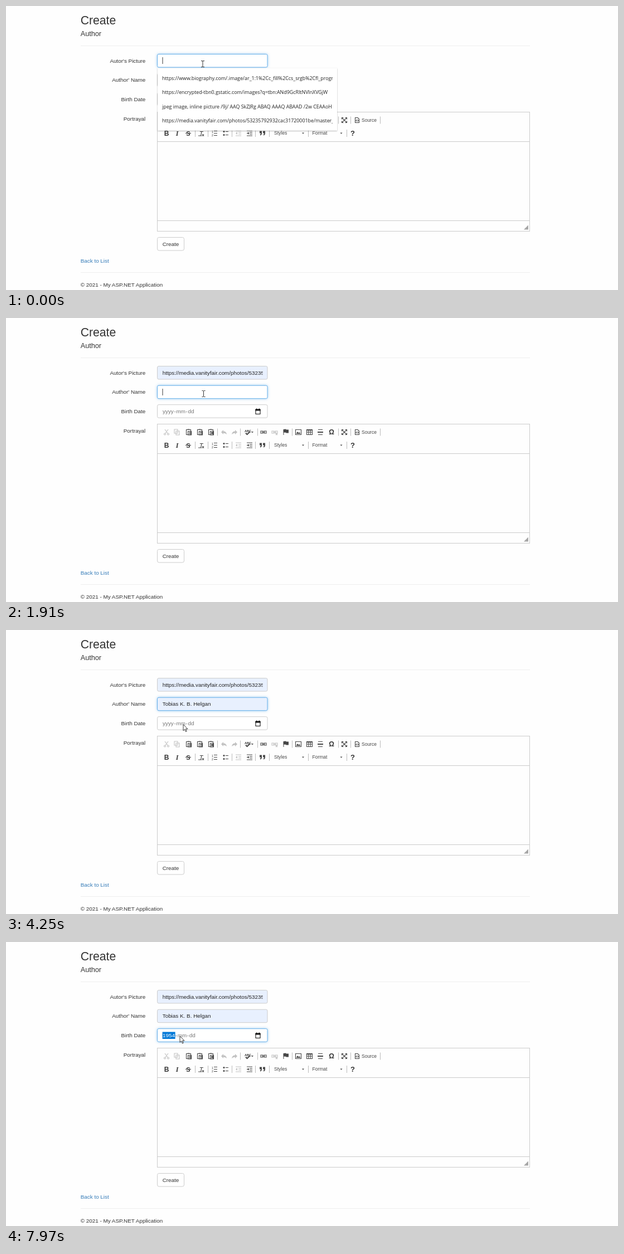
These frames come from a looping animation (1098x510 px, 8000 ms). An HTML page:

```html
<!DOCTYPE html>
<html lang="en">
<head>
<meta charset="utf-8">
<title>Create author form</title>
<style>
  html, body { margin: 0; width: 100%; height: 100%; overflow: hidden; background: #fefefe; }
  svg { display: block; }
  text { font: 9.9px "Liberation Sans", Arial, sans-serif; fill: #333; white-space: pre; }
  .bold { font-weight: bold; }
  .small { font-size: 8.5px; fill: #474747; }
  .field { fill: #fff; stroke: #ccc; }
  .filled { fill: #e8f0fe; }
  .focus { stroke: #66afe9; filter: drop-shadow(0 0 2.5px rgba(102, 175, 233, .6)); }
  .value { fill: #222; }
  .hint { fill: #757575; }
  .selected { fill: #fff; }
  .frame { fill: none; stroke: #cbcbcb; }
  .rule { stroke: #eee; }
  .sep { stroke: #bcbcbc; }
  .line { fill: none; stroke: #474747; stroke-width: 1.1; }
  .solid { fill: #474747; stroke: none; }
  .glyph { font-size: 12px; font-weight: bold; text-anchor: middle; }
  .off { opacity: .33; }
  .panel { fill: #fff; filter: drop-shadow(0 1px 1px rgba(0, 0, 0, .28)); }
  .option { font: 500 9.1px "Open Sans", "Noto Sans", sans-serif; fill: #222; }
  .address { font-size: 8.85px; }
  .caret { stroke: #222; stroke-width: .9; }
</style>
</head>
<body>
<svg width="1098" height="510" viewBox="0 0 1098 510">
  <text x="133.7" y="32.5" style="font-size:21.2px">Create</text>
  <text x="133.7" y="54" style="font-size:12.7px">Author</text>
  <path class="rule" d="M134 71.5H940M134 478.5H940"/>
  <g class="bold" text-anchor="end">
    <text x="250.3" y="101.7">Autor's Picture</text>
    <text x="250.3" y="136.3">Author' Name</text>
    <text x="250.3" y="171">Birth Date</text>
    <text x="250.3" y="205.6">Portrayal</text>
  </g>
  <rect class="frame" x="271.5" y="190.5" width="668" height="214"/>
  <path class="frame" d="M272 243.5H939M272 385.5H939"/>
  <path d="M937 393.5V401.5H929Z" fill="#a6a6a6"/>
  <g id="toolbar"></g>
  <rect class="field" x="271.5" y="415.5" width="48" height="23.5" rx="3"/>
  <text x="295.5" y="431" text-anchor="middle">Create</text>
  <text x="133.7" y="460.5" style="fill:#337ab7">Back to List</text>
  <text x="133.7" y="503.6">© 2021 - My ASP.NET Application</text>
  <g id="live"></g>
</svg>
<script>
const LOOP = 8000;
const byId = id => document.getElementById(id);

// Toolbar
const box = (x, y, w, h) => `M${x} ${y}h${w}v${h}h${-w}z`;
const ring = (x, y, r) => `M${x - r} ${y}a${r} ${r} 0 1 0 ${2 * r} 0a${r} ${r} 0 1 0 ${-2 * r} 0`;
const line = d => `<path class="line" d="${d}"/>`;
const solid = d => `<path class="solid" d="${d}"/>`;
const glyph = (s, style = '') => `<text class="glyph" y="4" style="${style}">${s}</text>`;
const at = (x, y, art, cls = '') => `<g class="${cls}" transform="translate(${x} ${y})">${art}</g>`;

const clipboard = line(box(-4.5, -4.5, 8, 9) + 'M-2.5-5h4' + box(-1.5, -1.5, 6, 6.5));
const backArrow = solid('M-5 0L-1-4V-1.5Q4-2 5 4Q3 1.5-1 1.5V4z');
const chain = line(box(-5, -2, 4, 4) + box(1, -2, 4, 4) + 'M-3 0H3');
const textLines = line('M-1-4H5M-1 0H5M-1 4H5');
const triangle = solid('M-2-1H2L0 1.3z');
const indentLines = line('M-5-4.5H5M0-1.5H5M0 1.5H5M-5 4.5H5');
const comma = 'h4v4q0 3-3 4v-2q1.2-.5 1.2-2h-2.2z';

const topRow = [
  [288, line('M-3-5L2 2M3-5L-2 2' + ring(-3, 3.5, 1.5) + ring(3, 3.5, 1.5)), 'off'],
  [307, line(box(-5, -5, 6, 7) + box(-2, -2, 6, 7)), 'off'],
  [328, clipboard + line('M0 .5H3M0 2.5H3')],
  [348, clipboard + line('M0 .5H3M1.5 .5V4')],
  [368, clipboard + solid(box(0, 0, 3, 3))],
  [391, backArrow, 'off'],
  [410, `<g transform="scale(-1 1)">${backArrow}</g>`, 'off'],
  [434, '<text x="-6" y="-.5" class="bold" style="font-size:5.5px">ABC</text>' +
        '<path class="line" style="stroke-width:2" d="M-4 1.5l2.5 2.5L4-1"/>'],
  [442, triangle],
  [462, chain],
  [482, chain + line('M2 2l3 3M5 2l-3 3'), 'off'],
  [502, solid('M-4.5-5h1v10h-1zM-3.5-5Q0-6 1-4.5H5V1.5H1Q-1-.2-3.5 .7z')],
  [524.5, line(box(-5, -4.5, 10, 9)) + solid('M-4 3L-1.5-1L.5 1.5L2 0L4 3z')],
  [544.5, line(box(-5, -4.5, 10, 9) + 'M-5-3.5H5M-5 0H5M-1.7-4V4M1.7-4V4')],
  [564, line('M-4-4.5H4M-5-.5H5M-5 .5H5M-4 4.5H4')],
  [584, glyph('Ω')],
  [607, line('M-4.5-1.5V-4.5H-1.5M1.5-4.5H4.5V-1.5M4.5 1.5V4.5H1.5M-1.5 4.5H-4.5V1.5') +
        line('M-4.5-4.5L4.5 4.5M4.5-4.5L-4.5 4.5')],
  [630, line('M-3.5-4.5H1L3.5-2V4.5H-3.5zM-.5-1L-2 .8L-.5 2.5M.7-1L2.2 .8L.7 2.5')],
];
const bottomRow = [
  [288, glyph('B')],
  [307, glyph('I', "font-style:italic;font-family:'Liberation Serif',serif")],
  [327, glyph('S', 'font-size:11px') + line('M-5 0H5')],
  [350, glyph('T', 'font-style:italic;font-size:11px;font-weight:normal') + line('M-5 4.5H1M2 2l3 3M5 2l-3 3')],
  [374, textLines + '<text x="-5" y="-1" style="font-size:5px">1</text><text x="-5" y="5.5" style="font-size:5px">2</text>'],
  [394, line('M0-3H5M0 3H5') + solid(ring(-3, -3, 1.6) + ring(-3, 3, 1.6))],
  [417, indentLines + solid('M-2-2.5V2.5L-5 0z'), 'off'],
  [437, indentLines + line('M-5 0H-2') + solid('M-3-2.5V2.5L-.5 0z')],
  [460, solid('M-5-4' + comma + 'M1-4' + comma)],
  [533, triangle],
  [601.5, triangle],
  [622, glyph('?', 'font-size:13px')],
];
const seps = (y, xs) => `<path class="sep" d="${xs.map(x => `M${x} ${y - 6.5}v13`).join('')}"/>`;
const small = (x, y, s) => `<text class="small" x="${x}" y="${y}">${s}</text>`;

byId('toolbar').innerHTML =
  topRow.map(([x, art, cls]) => at(x, 205, art, cls)).join('') +
  bottomRow.map(([x, art, cls]) => at(x, 228.5, art, cls)).join('') +
  seps(205, [379.5, 420.5, 451.5, 513.5, 596.5, 618.5, 671.5]) +
  seps(228.5, [339.5, 362.5, 405.5, 447.5, 472.5, 542.5, 611.5]) +
  small(638, 208, 'Source') + small(481, 231.2, 'Styles') + small(549.5, 231.2, 'Format');

// Timeline: each track holds its value until the next entry
const addresses = [
  'https://www.biography.com/.image/ar_1:1%2Cc_fill%2Ccs_srgb%2Cfl_progressive',
  'https://encrypted-tbn0.gstatic.com/images?q=tbn:ANd9GcRItNVlnXVGjW',
  'jpeg image, inline picture /9j/ AAQ SkZJRg ABAQ AAAQ ABAAD /2w CEAAoH',
  'https://media.vanityfair.com/photos/53235792932cac31720001be/master_',
];
const author = 'Tobias K. B. Helgan';
const names = ['VARDEN PIKE AND THE LORDS OF ELMOTH', "Brann's Grill", 'Corby Denner',
  'L.B. Tarvick', 'Quilla', 'Melon Hollow 2'];

const lists = {
  addresses: { top: 111.5, width: 322, items: addresses, cls: 'address' },
  names: { top: 146, width: 220, items: names },
  match: { top: 146, width: 197, items: [author] },
};
const tracks = {
  focus: [[0, 'picture'], [1910, 'name'], [4900, 'date']],
  list: [[0, 'addresses'], [1080, ''], [2040, 'names'], [2610, 'match'], [3690, '']],
  hover: [[0, -1], [160, 1], [280, 2], [570, 3], [1080, -1], [3300, 0]],
  picture: [[0, ''], [160, addresses[1]], [280, addresses[2]], [570, addresses[3]]],
  name: [[0, ''], [2610, author[0]], [3300, author]],
  year: [[0, 'yyyy'], [5790, '0001'], [6190, '0019'], [6470, '0195'], [6740, '1954']],
  caret: [[0, [281, 98]], [160, null], [1910, [281, 133]], [2470, null], [2610, [287.5, 133]],
    [3180, null], [3690, [369.5, 133]], [4250, null], [4640, [369.5, 133]], [4900, null]],
  pointer: [
    [0, ['beam', 353, 104]], [160, ['arrow', 354, 148]], [280, ['arrow', 356, 184]],
    [430, ['arrow', 361, 195]], [570, ['arrow', 362, 202]], [690, ['arrow', 362, 204]],
    [1080, ['arrow', 358, 150]], [1230, ['beam', 358, 136]], [1350, ['beam', 356, 131]],
    [1490, ['beam', 354.5, 136]], [2320, ['beam', 357.5, 90]], [2470, ['arrow', 364.5, 69.5]],
    [2610, ['arrow', 366, 67]], [2900, ['beam', 359, 92]], [3020, ['beam', 354.5, 105]],
    [3180, ['beam', 354, 130]], [3300, ['arrow', 352, 155]], [3420, ['arrow', 351, 161]],
    [3820, ['arrow', 351, 165]], [3950, ['arrow', 351, 167.5]], [4100, ['arrow', 341, 169]],
    [4250, ['arrow', 318, 169.5]], [4370, ['arrow', 312, 171]], [4520, ['arrow', 302, 173]],
    [4640, ['arrow', 296, 175]], [4900, ['arrow', 294, 172]], [7420, ['arrow', 301, 170]],
    [7540, ['arrow', 309, 167]], [7830, ['arrow', 310, 167.5]], [7970, ['arrow', 312, 169]],
  ],
};
const valueAt = (track, t) => track.findLast(([start]) => start <= t)[1];

// Live parts
const field = (y, focused, filled) =>
  `<rect class="field ${filled ? 'filled' : ''} ${focused ? 'focus' : ''}" x="271.5" y="${y}" width="197.5" height="23.5" rx="2.5"/>`;

const clipped = (x, y, width, cls, s) =>
  `<svg x="${x}" y="${y - 12}" width="${width}" height="24"><text class="${cls}" y="15.6">${s}</text></svg>`;

function dateText(year, selected) {
  const width = year === 'yyyy' ? 21 : 23;
  return (selected ? `<rect x="280.6" y="161.5" width="${width}" height="12.5" fill="#0078d7"/>` : '') +
    `<text class="hint" x="281" y="171"><tspan class="${selected ? 'selected' : ''}">${year}</tspan>` +
    ['-', 'mm', '-', 'dd'].map(s => `<tspan dx=".7">${s}</tspan>`).join('') + '</text>' +
    '<path d="M448 164.5h8v8h-8z" fill="none" stroke="#111" stroke-width="1.1"/>' +
    '<path d="M447.5 163.5h9v3h-9zM449 162.5h1.2v2h-1.2zM453.8 162.5h1.2v2h-1.2z" fill="#111"/>';
}

function dropdown({ top, width, items, cls = '' }, hover) {
  const pitch = 25.4, first = top + 5.3;
  return `<rect class="panel" x="272" y="${top}" width="${width}" height="${items.length * pitch + 10.6}"/>` +
    (hover < 0 ? '' : `<rect x="272" y="${first + hover * pitch}" width="${width}" height="${pitch}" fill="#e6e6e6"/>`) +
    items.map((s, i) => clipped(280, first + (i + .5) * pitch, width - 16, 'option ' + cls, s)).join('');
}

const pointers = {
  arrow: '<path d="M0 0V11.3L2.6 8.9L4.5 13.1L6.2 12.3L4.4 8.2H8Z" fill="#fff" stroke="#222" stroke-width=".9"/>',
  beam: '<path d="M-3-5.5H-1L0-5L1-5.5H3M0-5V5M-3 5.5H-1L0 5L1 5.5H3" fill="none" stroke="#333"/>',
};

function scene(t) {
  const now = {};
  for (const key in tracks) now[key] = valueAt(tracks[key], t);
  const { focus, list, hover, picture, name, year, caret, pointer: [kind, x, y] } = now;
  return field(86.5, focus === 'picture', picture) +
    field(121.2, focus === 'name', name === author) +
    field(155.7, focus === 'date', false) +
    clipped(280.7, 98, 180, 'value', picture) +
    clipped(280.7, 132.6, 180, 'value', name) +
    dateText(year, focus === 'date') +
    (caret ? `<path class="caret" d="M${caret[0]} ${caret[1] - 6}v12"/>` : '') +
    (list ? dropdown(lists[list], hover) : '') +
    at(x, y, pointers[kind]);
}

const live = byId('live');
let shown = '';
function draw() {
  const next = scene(performance.now() % LOOP);
  if (next !== shown) live.innerHTML = shown = next;
  requestAnimationFrame(draw);
}
draw();
</script>
</body>
</html>
```
